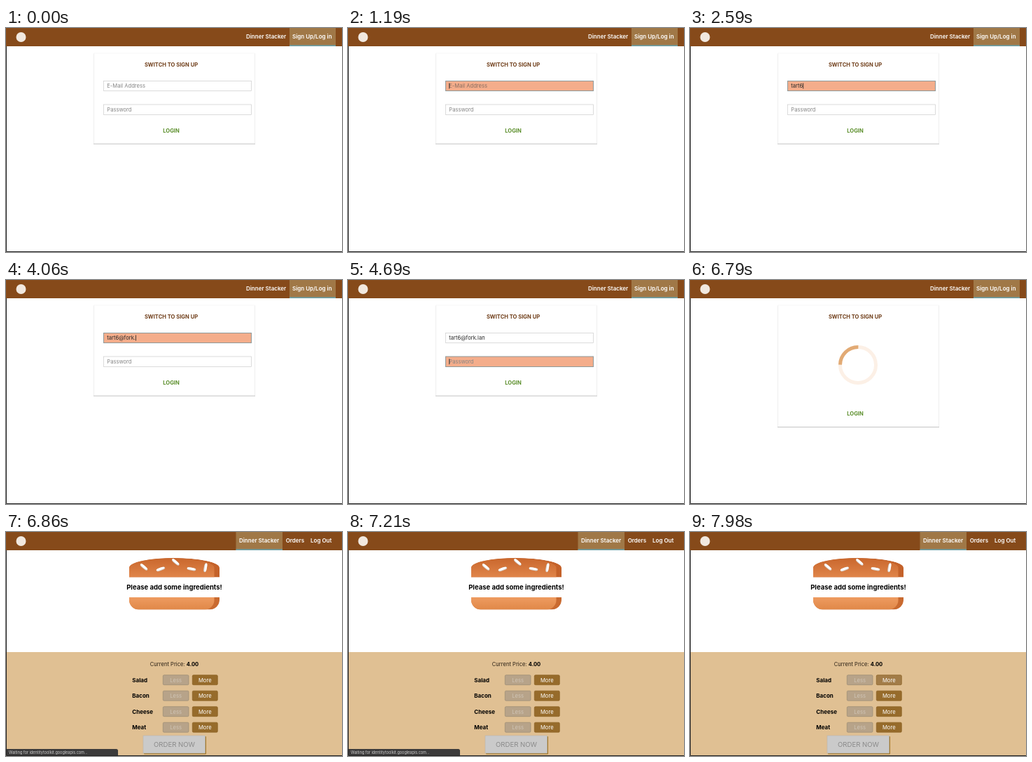
An HTML page that plays this animation: 480 by 319 pixels, repeating every 8000 ms.

```html
<!DOCTYPE html>
<html lang="en">
<head>
<meta charset="utf-8">
<title>Sign in</title>
<style>
  html, body { margin: 0; width: 100%; height: 100%; overflow: hidden; background: #fff; }
  svg { display: block; width: 480px; height: 319px; font: 7.6px Inter, "Open Sans", sans-serif; }
  .nav { font-size: 8px; font-weight: 600; fill: #fff; }
  .bold { font-weight: 700; }
  .mid { text-anchor: middle; }
</style>
</head>
<body>
<svg id="stage" viewBox="0 0 480 319">
  <defs>
    <linearGradient id="crust" x2="0" y2="1">
      <stop stop-color="#c9672d"/><stop offset="1" stop-color="#e0854a"/>
    </linearGradient>
    <linearGradient id="base" x2="0" y2="1">
      <stop stop-color="#ee9b60"/><stop offset="1" stop-color="#e08848"/>
    </linearGradient>
    <path id="bunTop" d="M176 64.5V50.7A64.5 13.7 0 0 1 305 50.7V64.5Z"/>
    <path id="bunBottom" d="M176 93H305V97A13.5 13.5 0 0 1 291.5 110.5H189.5A13.5 13.5 0 0 1 176 97Z"/>
    <clipPath id="clipTop"><use href="#bunTop"/></clipPath>
    <clipPath id="clipBottom"><use href="#bunBottom"/></clipPath>
    <filter id="soft" x="-5%" y="-5%" width="110%" height="110%"><feGaussianBlur stdDeviation=".7"/></filter>
  </defs>
  <rect width="480" height="319" fill="#fff"/>
  <rect width="480" height="26" fill="#864a1a"/>
  <circle cx="21.5" cy="13" r="7" fill="#f1e8df"/>

  <g id="login">
    <g id="loginNav"></g>
    <rect id="shadow" x="125" y="37" width="231" fill="#bbb" filter="url(#soft)"/>
    <rect id="card" x="125.25" y="36" width="230.5" fill="#fff" stroke="#eee" stroke-width=".5"/>
    <text class="mid bold" x="236" y="54.7" fill="#703f1b">SWITCH TO SIGN UP</text>
    <text id="submit" class="mid bold" x="236" fill="#5c8f2c">LOGIN</text>
    <g id="fields">
      <rect id="emailBox" x="139.5" y="75.5" width="211" height="14"/>
      <rect id="passBox" x="139.5" y="109" width="211" height="14.5"/>
      <text id="email" x="144.3" y="85.2"></text>
      <text id="passHint" x="144.3" y="118.9" fill="#858585">Password</text>
      <g id="dots" fill="#333"></g>
      <rect id="caret" width=".8" height="8" fill="#222"/>
    </g>
    <g id="spinner" fill="none" stroke-width="5">
      <circle cx="240" cy="121" r="25.5" stroke="#fcf0e6"/>
      <circle id="arc" cx="240" cy="121" r="25.5" stroke="#e2aa74" pathLength="4" stroke-dasharray="1 3"/>
    </g>
  </g>

  <g id="builder">
    <g id="builderNav"></g>
    <g clip-path="url(#clipTop)">
      <use href="#bunTop" fill="#c4622a"/><use href="#bunTop" x="-7.5" fill="url(#crust)"/>
    </g>
    <g id="seeds"></g>
    <g clip-path="url(#clipBottom)">
      <use href="#bunBottom" fill="#c96a30"/><use href="#bunBottom" x="-7.5" fill="url(#base)"/>
    </g>
    <text class="mid bold" x="240.5" y="81.8" font-size="9.5">Please add some ingredients!</text>
    <rect y="171" width="480" height="148" fill="#e0c093"/>
    <text class="mid" x="240.5" y="190.5" fill="#2b2116">Current Price: <tspan class="bold" fill="#000">4.00</tspan></text>
    <g id="controls"></g>
    <rect x="197" y="291" width="89" height="25.5" rx="1" fill="#a57a2c" filter="url(#soft)"/>
    <rect x="196" y="290" width="88.5" height="25" fill="#cacaca" stroke="#b8b4ae" stroke-width=".6"/>
    <text class="mid" x="240.5" y="306" font-size="9.6" fill="#8b8b8b">ORDER NOW</text>
    <g id="status">
      <path d="M0 309H157.5Q160 309 160 311.5V318H0Z" fill="#3c3b3b"/>
      <text x="4" y="315.6" font-size="5.5" fill="#d0d0d0">Waiting for identitytoolkit.googleapis.com...</text>
    </g>
  </g>
  <path d="M.5 26V318.5H480" fill="none" stroke="#222"/>
</svg>
<script>
const LOOP = 8000, TICK = 70;
const EMAIL = "tart6@fork.lan";
const EMAIL_KEYS = [1680, 1890, 2170, 2380, 2590, 2870, 3150, 3290, 3500, 3710, 4060, 4270, 4410, 4550];
const PASS_KEYS = [4970, 5320, 5670, 5880, 6090, 6300];
const EMAIL_FOCUS = 1190, PASS_FOCUS = 4690, SUBMIT = 6650, LOGGED_IN = 6860, HOVER = 7910;
const SPIN = 1100, BLINK = 490, DOT_GAP = 2.35;

const el = {};
document.querySelectorAll("[id]").forEach(node => el[node.id] = node);

const set = (node, attrs) => {
  for (const name in attrs) node.setAttribute(name, attrs[name]);
};
const show = (node, on) => node.style.display = on ? "" : "none";
const activeTab = (x, width) =>
  `<rect x="${x}" width="${width}" height="26" fill="#a07847"/>
   <rect x="${x}" y="24.3" width="${width}" height="1.7" fill="#6b9fa5"/>`;
const link = (x, label) => `<text class="nav" x="${x}" y="14.9">${label}</text>`;

el.loginNav.innerHTML = activeTab(405, 66) + link(343, "Dinner Stacker") + link(409, "Sign Up/Log in");
el.builderNav.innerHTML = activeTab(328.5, 66.5) + link(333, "Dinner Stacker") +
  link(399.7, "Orders") + link(435, "Log Out");

const seed = ([x, y, angle]) =>
  `<g transform="translate(${x} ${y}) rotate(${angle})">
     <rect x="-6.4" y="-2.1" width="12.8" height="4.2" rx="5" ry="1.7" fill="#d3cdc8"/>
     <rect x="-6.4" y="-2.1" width="12" height="3.2" rx="4.7" ry="1.4" fill="#fff"/>
   </g>`;
el.seeds.innerHTML = [[197, 50, 40], [221, 52.8, -20], [242.3, 43, 40], [265, 52.8, 10], [284.8, 50.8, 100]]
  .map(seed).join("");

const button = (x, y, width, label, fill, stroke, color) =>
  `<rect x="${x}" y="${y - 7}" width="${width}" height="14" rx="1.5" fill="${fill}" stroke="${stroke}" stroke-width=".7"/>
   <text class="mid" x="${x + width / 2}" y="${y + 2.8}" fill="${color}">${label}</text>`;
el.controls.innerHTML = ["Salad", "Bacon", "Cheese", "Meat"].map((name, i) => {
  const y = 210.7 + i * 22.5;
  return `<text class="bold" x="180.3" y="${y + 2.8}" font-size="8">${name}</text>` +
    button(224.3, y, 36.7, "Less", "#b7a389", "#998a75", "#d0c5b6") +
    `<g class="more">${button(266.3, y, 36, "More", "#966b2b", "#8a6023", "#fff")}</g>`;
}).join("");
const saladMore = document.querySelector(".more rect");

el.dots.innerHTML = PASS_KEYS.map((_, i) =>
  `<circle cx="${145.7 + i * DOT_GAP}" cy="116.3" r=".8"/>`).join("");

const typed = (keys, t) => keys.filter(key => key <= t).length;

function paintField(box, focused) {
  set(box, focused
    ? { fill: "#f4ad8b", stroke: "#8f9a9a", "stroke-width": 1 }
    : { fill: "#fff", stroke: "#ccc", "stroke-width": .7 });
}

function drawFields(t) {
  const onPass = t >= PASS_FOCUS, onEmail = t >= EMAIL_FOCUS && !onPass;
  const letters = typed(EMAIL_KEYS, t), dots = typed(PASS_KEYS, t);
  paintField(el.emailBox, onEmail);
  paintField(el.passBox, onPass);
  el.email.textContent = letters ? EMAIL.slice(0, letters) : "E-Mail Address";
  set(el.email, { fill: letters ? "#2b2b2b" : onEmail ? "#8a6f62" : "#858585" });
  show(el.passHint, !dots);
  [...el.dots.children].forEach((dot, i) => show(dot, i < dots));

  const events = [EMAIL_FOCUS, ...EMAIL_KEYS, PASS_FOCUS, ...PASS_KEYS].filter(time => time <= t);
  const idle = t - events[events.length - 1];
  show(el.caret, events.length && Math.floor(idle / BLINK) % 2 === 0);
  const advance = onPass ? dots * DOT_GAP : letters ? el.email.getComputedTextLength() : 0;
  set(el.caret, { x: 144.4 + advance, y: onPass ? 112.2 : 78.5 });
}

function draw(t) {
  const loading = t >= SUBMIT, loggedIn = t >= LOGGED_IN;
  show(el.login, !loggedIn);
  show(el.builder, loggedIn);
  if (loggedIn) {
    el.status.style.opacity = Math.min(1, Math.max(0, (7630 - t) / 210));
    set(saladMore, { fill: t >= HOVER ? "#a27c48" : "#966b2b" });
    return;
  }
  const bottom = loading ? 209 : 164.5;
  set(el.card, { height: bottom - 36 });
  set(el.shadow, { height: bottom - 36 });
  set(el.submit, { y: loading ? 193.3 : 149.2 });
  show(el.fields, !loading);
  show(el.spinner, loading);
  if (loading) set(el.arc, { transform: `rotate(${135 + (t - SUBMIT) / SPIN * 360} 240 121)` });
  else drawFields(t);
}

function frame() {
  const t = performance.now() % LOOP;
  draw(Math.floor(t / TICK) * TICK);
  requestAnimationFrame(frame);
}
frame();
</script>
</body>
</html>
```
